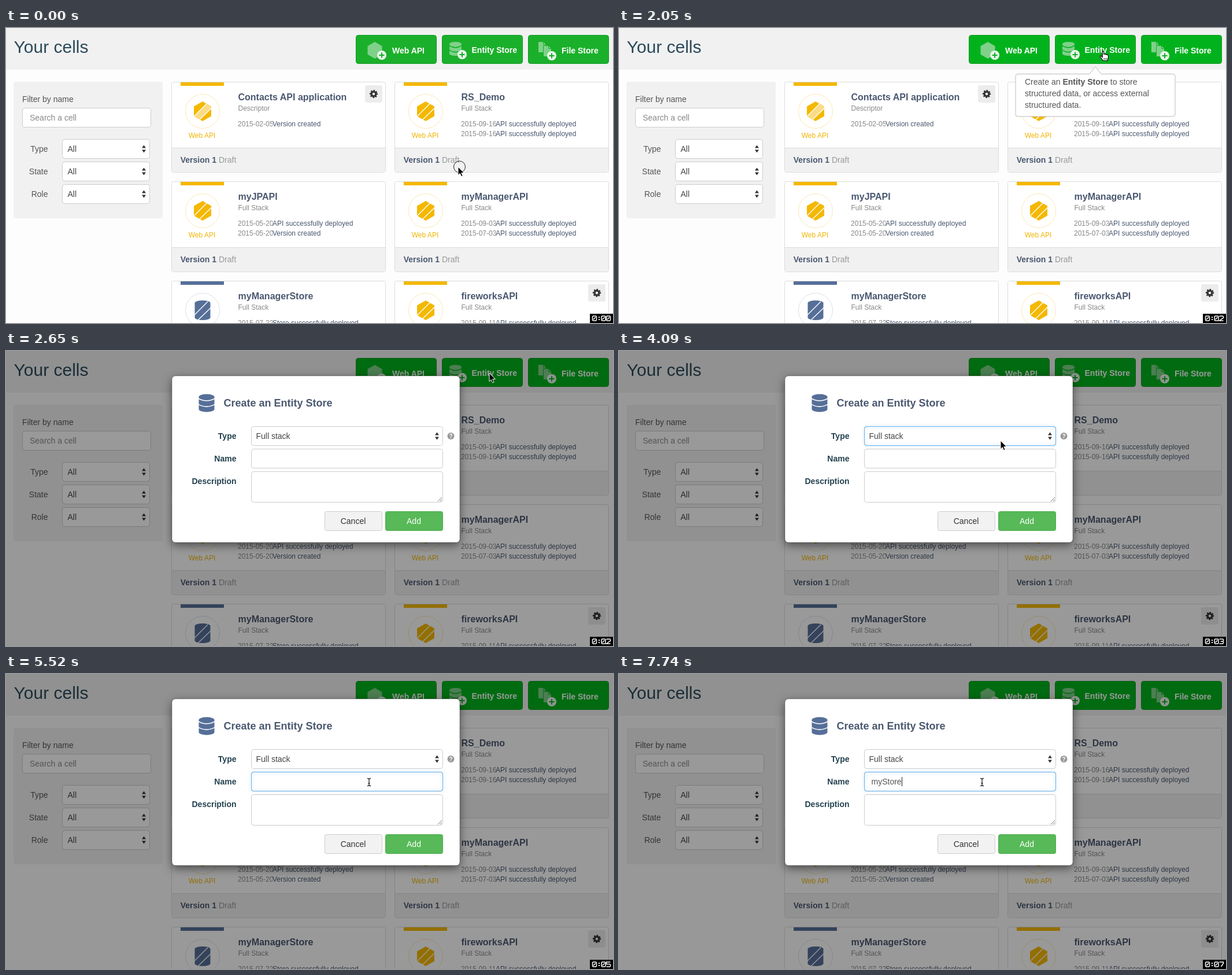
These frames come from a looping animation (1050 px wide and 510 px high, 8000 ms). An HTML page:

```html
<!DOCTYPE html>
<html lang="en">
<head>
<meta charset="utf-8">
<title>Your cells</title>
<style>
  html, body { margin: 0; width: 100%; height: 100%; overflow: hidden; background: #fdfdfd; }
  svg { display: block; }
  text { font-family: "Liberation Sans", Arial, sans-serif; font-size: 14px; fill: #555; white-space: pre; }
  .b { font-weight: bold; }
  .s { font-size: 12px; }
  .end { text-anchor: end; }
  .mid { text-anchor: middle; }
  .box { fill: #fff; stroke: #ccc; }
  .focus { fill: none; stroke: #66afe9; filter: drop-shadow(0 0 3px #66afe9b0); }
  #modal > .panel { filter: drop-shadow(0 5px 8px #00000080); }
</style>
</head>
<body>
<svg id="stage" width="1050" height="510" viewBox="0 0 1050 510"></svg>
<script>
const LOOP = 8000;
const YELLOW = '#f4b800', BLUE = '#566f98', SLATE = '#4a5870';

const rect = (x, y, w, h, attrs = '') => `<rect x="${x}" y="${y}" width="${w}" height="${h}" ${attrs}/>`;
const text = (x, y, str, cls = '', fill = '') =>
  `<text x="${x}" y="${y}" class="${cls}"${fill && ` style="fill:${fill}"`}>${str}</text>`;
const path = (d, attrs = '') => `<path d="${d}" ${attrs}/>`;
const group = (x, y, inner, attrs = '') => `<g transform="translate(${x} ${y})" ${attrs}>${inner}</g>`;
const field = (x, y, w, h) => rect(x + .5, y + .5, w - 1, h - 1, 'rx="4" class="box"');
const arrows = (x, y) => path(`M${x - 3.5} ${y - 1.5}h7l-3.5-5zM${x - 3.5} ${y + 1.5}h7l-3.5 5z`, 'fill="#333"');
const hexagon = (w, h) => `M0 ${-h}L${w} ${-h / 2}V${h / 2}L0 ${h}L${-w} ${h / 2}V${-h / 2}Z`;
const drum = (w, h, r) => `M${-w} ${-h + r}A${w} ${r} 0 0 1 ${w} ${-h + r}V${h - r}A${w} ${r} 0 0 1 ${-w} ${h - r}Z`;

// Drum cut into three discs by curved gaps.
function discs(w, h, fill, gap) {
  const cut = y => path(`M${-w - 1} ${y}Q0 ${y + 8} ${w + 1} ${y}`, `fill="none" stroke="${gap}" stroke-width="1.6"`);
  return path(drum(w, h, h * .32), `fill="${fill}"`) + cut(-h * .52) + cut(h * .14);
}

function gear(x, y) {
  return group(x, y, rect(-15, -15, 30, 30, 'rx="3" fill="#ececec"') +
    `<g fill="none" stroke="#333"><circle r="3.9" stroke-width="3.2"/>
     <circle r="5.8" stroke-width="2.6" stroke-dasharray="2.5 2.055" transform="rotate(-12)"/></g>`);
}

function cellIcon(kind) {
  const store = kind === 'store';
  const shape = path(store ? drum(13.5, 17, 4.5) : hexagon(15, 17), `fill="${store ? BLUE : YELLOW}"`);
  const band = kind === 'descriptor'
    ? path('M-14.5 9L8-13L15-8.5V-5L-6 14Z', 'fill="#fadc86"') : '';
  const cuts = path('M-16 10L9-15M-8 17L17-7', 'stroke="#fff" stroke-width="1.4"');
  return `<circle r="29.5" fill="none" stroke="${store ? '#d9dfe9' : '#fbe8b4'}"/>` + shape + band + cuts;
}

function card(col, row, title, kind, events, hasGear, id = '') {
  const type = kind === 'descriptor' ? 'Descriptor' : 'Full Stack';
  const lines = events.map(([date, what], i) => {
    const y = 76.5 + 17 * i;
    return `<svg x="115" y="${y - 12}" width="60.5" height="18">${text(0, 12, date, 's', '#888')}</svg>` +
      text(175, y, what, 's', SLATE);
  }).join('');
  return group(286 + 386 * col, 93.5 + 172 * row,
    rect(.5, 0, 370, 156, `rx="3" fill="#fff" stroke="#dcdcdc" ${id && `id="${id}"`}`) +
    path('M1 114H370V153Q370 155.500 368 155.500H3Q1 155.500 1 153Z', 'fill="#f1f1f1"') +
    path('M1 114H370', 'stroke="#dcdcdc"') +
    rect(16, .5, 75, 6, `fill="${kind === 'store' ? BLUE : YELLOW}"`) +
    group(54, 50.5, cellIcon(kind)) +
    text(53, 96.5, 'Web API', 's mid', '#efb400') +
    text(115.500, 31.500, title, 'b', SLATE).replace('class="b"', 'class="b" font-size="16"').replace('style="', 'style="font-size:16px;') +
    text(115.500, 49.500, type, 's', '#888') + lines +
    text(15.700, 139.500, 'Version 1', 'b', SLATE) + text(82, 139.500, 'Draft', '', '#999') +
    (hasGear ? gear(350, 20.500) : ''));
}

function button(x, label, labelX, labelY, icon, plusX, plusY) {
  return rect(x + .5, 12.500, 139, 49, 'rx="4" class="green" stroke="#0a9a20"') + icon +
    group(plusX, plusY, '<circle r="8" fill="#e9f8ea"/>' +
      path('M-4.500 0H4.500M0-4.500V4.500', 'stroke="#0fae25" stroke-width="2"')) +
    text(labelX, labelY, label, 'b', '#fff');
}

function page() {
  const pale = '#7fd189', green = '#0fb026';
  const deployed = 'API successfully deployed', created = 'Version created';
  const filters = ['Type', 'State', 'Role'].map((name, i) => {
    const y = 192 + 39 * i;
    return text(72.500, y + 22, name, 'end') + field(97, y, 152, 34) + text(106.500, y + 22, 'All', '', '#444') + arrows(238.500, y + 17);
  }).join('');
  const sheet = (x, y) => path(`M${x} ${y}h9l5 5v14h-14z`, `fill="${pale}" stroke="${green}"`) +
    path(`M${x + 9} ${y}v5h5`, `fill="none" stroke="${green}"`);
  return rect(0, 0, 1050, 510, 'fill="#fdfdfd"') + rect(0, 0, 1050, 72, 'fill="#f1f1f1"') +
    text(13.500, 43, 'Your cells', '', '#2b4a5b').replace('style="', 'style="font-size:30px;') +
    button(605, 'Web API', 668, 44, group(638, 38.500, path(hexagon(12.500, 14.500), `fill="${pale}"`)), 650, 47) +
    button(754, 'Entity Store', 805.500, 43, group(777.500, 36, discs(10.500, 12, pale, green)), 789, 46) +
    button(903, 'File Store', 961, 44, sheet(920.500, 23.500) + sheet(929.500, 30.500), 944, 48) +
    rect(13, 93, 258, 236, 'rx="4" fill="#f1f1f1"') +
    text(28, 128, 'Filter by name') + field(28, 138, 223, 34) + text(41, 160, 'Search a cell', '', '#888') + filters +
    card(0, 0, 'Contacts API application', 'descriptor', [['2015-02-05', created]], true) +
    card(1, 0, 'RS_Demo', 'full', [['2015-09-16', deployed], ['2015-09-16', deployed]], false, 'demo') +
    card(0, 1, 'myJPAPI', 'full', [['2015-05-20', deployed], ['2015-05-20', created]]) +
    card(1, 1, 'myManagerAPI', 'full', [['2015-09-03', deployed], ['2015-07-03', deployed]]) +
    card(0, 2, 'myManagerStore', 'store', [['2015-07-22', 'Store successfully deployed']]) +
    card(1, 2, 'fireworksAPI', 'full', [['2015-09-11', deployed]], true);
}

const popover = () =>
  path('M690 79.500H814L824 67L834 79.500H958Q962 79.500 962 83.500V149Q962 153 958 153H690Q686 153 686 149V83.500Q686 79.500 690 79.500Z',
    'fill="#fff" stroke="#bbb"') +
  text(702, 98, 'Create an <tspan class="b">Entity Store</tspan> to store') +
  text(702, 118, 'structured data, or access external') + text(702, 138, 'structured data.');

const modal = () =>
  rect(0, 0, 1050, 510, 'fill="#000" opacity=".4"') +
  rect(287, 43, 498, 288, 'rx="6" fill="#fff" stroke="#00000050" class="panel"') +
  group(347, 90, discs(13.500, 15.500, BLUE, '#fff')) +
  text(376.500, 96, 'Create an Entity Store', 'b', SLATE).replace('style="', 'style="font-size:18px;') +
  ['Type', 'Name', 'Description'].map((s, i) => text(398.500, 152 + 39 * i, s, 'b end', '#23414f')).join('') +
  field(424, 130, 332, 34) + field(424, 169, 332, 34) + field(424, 208, 332, 54) +
  text(432.500, 152, 'Full stack', '', '#444') + arrows(745.500, 147) +
  '<circle cx="769.500" cy="147" r="6" fill="#999"/>' +
  text(769.500, 151, '?', 'b mid', '#fff').replace('style="', 'style="font-size:10px;') +
  path('M747 260L754 253M751 260L754 257', 'stroke="#777"') +
  rect(551.500, 277.500, 99, 33, 'rx="3" fill="#f2f2f2" stroke="#ccc"') + text(600.500, 299, 'Cancel', 'mid', '#333') +
  rect(656.500, 277.500, 99, 33, 'rx="3" fill="#57b957" stroke="#4cae4c"') + text(705.500, 299, 'Add', 'mid', '#fff') +
  rect(424.500, 130.500, 331, 33, 'rx="4" class="focus" id="typeFocus"') +
  rect(424.500, 169.500, 331, 33, 'rx="4" class="focus" id="nameFocus"') +
  text(436.500, 191, '', '', '#555').replace('<text', '<text id="typed"') +
  rect(0, 178, 1, 16, 'id="caret" fill="#222"');

const pointers = {
  arrow: path('M0 0V14.500L3.300 11.500L5.700 16.800L8.100 15.700L5.800 10.500H10.300Z', 'fill="#000" stroke="#fff"'),
  hand: path('M.2 2Q1.500.2 2.800 2V7L3.400 5.800Q5 5.200 5.600 6.700Q7.300 5.800 8.200 7.500Q10.200 7 10.400 9V12.500L8.800 17.500H1.500L-3.600 11Q-4.200 9-2.400 9L.2 11.300Z',
    'fill="#fff" stroke="#000" stroke-width="1.200"') + path('M3 13v3M5.200 13v3M7.400 13v3', 'stroke="#000" stroke-width=".8"'),
  beam: path('M-3-6.500Q0-6.500 0-4.500Q0-6.500 3-6.500M0-5V5M-3 6.500Q0 6.500 0 4.500Q0 6.500 3 6.500M-1.500 2H1.500',
    'fill="none" stroke="#222" stroke-width="1.300"')
};

// Strokes of the clock's square digits on a 7 by 8 grid.
const digits = ['M1 0H6L7 1V7L6 8H1L0 7V1ZM1.500 6L5.500 2', 'M1 2L3.500 0V8M1 8H6', 'M0 1L1 0H6L7 1V3L0 8H7',
  'M0 0H6L7 1V3L6 4H2M6 4L7 5V7L6 8H0', 'M5.500 8V0L0 5.500H7', 'M7 0H0V3.500H6L7 4.500V7L6 8H0',
  'M6 0H1L0 1V7L1 8H6L7 7V4.500H0', 'M0 0H7V2L3 8'];

stage.innerHTML = page() +
  rect(753.500, 11.500, 141, 51, 'rx="4" id="buttonFocus" fill="none" stroke="#3f8fdc" stroke-width="2.500"') +
  `<g id="popover">${popover()}</g><g id="modal">${modal()}</g>` +
  '<circle id="ring" r="10" fill="none" stroke="#222"/>' +
  Object.entries(pointers).map(([id, d]) => `<g id="${id}">${d}</g>`).join('') +
  rect(1010, 494, 40, 16, 'fill="#000"') +
  '<g fill="none" stroke="#fff" stroke-width="1.500">' +
  group(1014.500, 498, path(digits[0])) + group(1030, 498, path(digits[0])) +
  group(1038.500, 498, '<path id="second"/>') + '</g>' + path('M1025 499h2v2h-2zM1025 503h2v2h-2z', 'fill="#fff"');

const el = id => document.getElementById(id);
const show = (id, opacity) => { el(id).style.opacity = +opacity; };
const between = (t, a, b) => t >= a && t < b;
// Value of the latest [time, value] entry reached.
const at = (t, keys) => keys.filter(k => k[0] <= t).pop();

const pointerKeys = [
  [0, 782, 240, 'arrow'], [750, 785, 232, 'arrow'], [880, 797, 204, 'hand'], [1000, 815, 173, 'hand'],
  [1150, 830, 142, 'hand'], [1300, 836, 80, 'arrow'], [1450, 837, 45, 'hand'], [1600, 836, 39, 'hand'],
  [2650, 836, 38, 'arrow'], [3650, 828, 52, 'arrow'], [3790, 775, 102, 'arrow'], [3940, 695, 144, 'arrow'],
  [4090, 660, 155, 'arrow'], [4190, 642, 170, 'beam'], [4330, 631, 183, 'beam'], [4480, 628, 187, 'beam']];
const typing = [5670, 5970, 6710, 6850, 7300, 7590, 7740];
const ticks = [1000, 2050, 3080, 4190, 5080, 6110, 7150];
const popoverKeys = [[0, 0], [1450, .4], [1600, 1], [2500, .08], [2650, 0]];
const typeFocusKeys = [[0, 0], [2950, .3], [3080, .8], [3200, 1], [4930, .4], [5080, 0]];
const nameFocusKeys = [[0, 0], [4930, .5], [5080, 1]];

function draw(t) {
  const [, x, y, kind] = at(t, pointerKeys);
  for (const id in pointers) show(id, id === kind);
  el(kind).setAttribute('transform', `translate(${x} ${y})`);

  const pressed = t < 150 || between(t, 2200, 2500) || between(t, 4930, 5230);
  show('ring', pressed);
  el('ring').setAttribute('transform', `translate(${x + (kind === 'arrow' ? 2.500 : 0)} ${y})`);

  el('demo').setAttribute('fill', kind === 'hand' && y > 94 ? '#f1f1f1' : '#fff');
  const green = t < 750 ? '#1bb02b' : '#02b21d';
  document.querySelectorAll('.green').forEach(b => b.setAttribute('fill', green));

  show('buttonFocus', between(t, 2200, 2650));
  show('popover', at(t, popoverKeys)[1]);
  show('modal', t >= 2650);
  show('typeFocus', at(t, typeFocusKeys)[1]);
  show('nameFocus', at(t, nameFocusKeys)[1]);

  const count = typing.filter(k => k <= t).length;
  el('typed').textContent = 'myStore'.slice(0, count);
  const lastKey = count ? typing[count - 1] : 5080;
  show('caret', t >= 5080 && t - lastKey < 440);
  el('caret').setAttribute('x', Math.round(436.500 + (count ? el('typed').getComputedTextLength() : 0)));

  el('second').setAttribute('d', digits[ticks.filter(k => k <= t).length]);
}

function frame(now) {
  draw(now % LOOP);
  requestAnimationFrame(frame);
}
draw(0);
requestAnimationFrame(frame);
</script>
</body>
</html>
```
